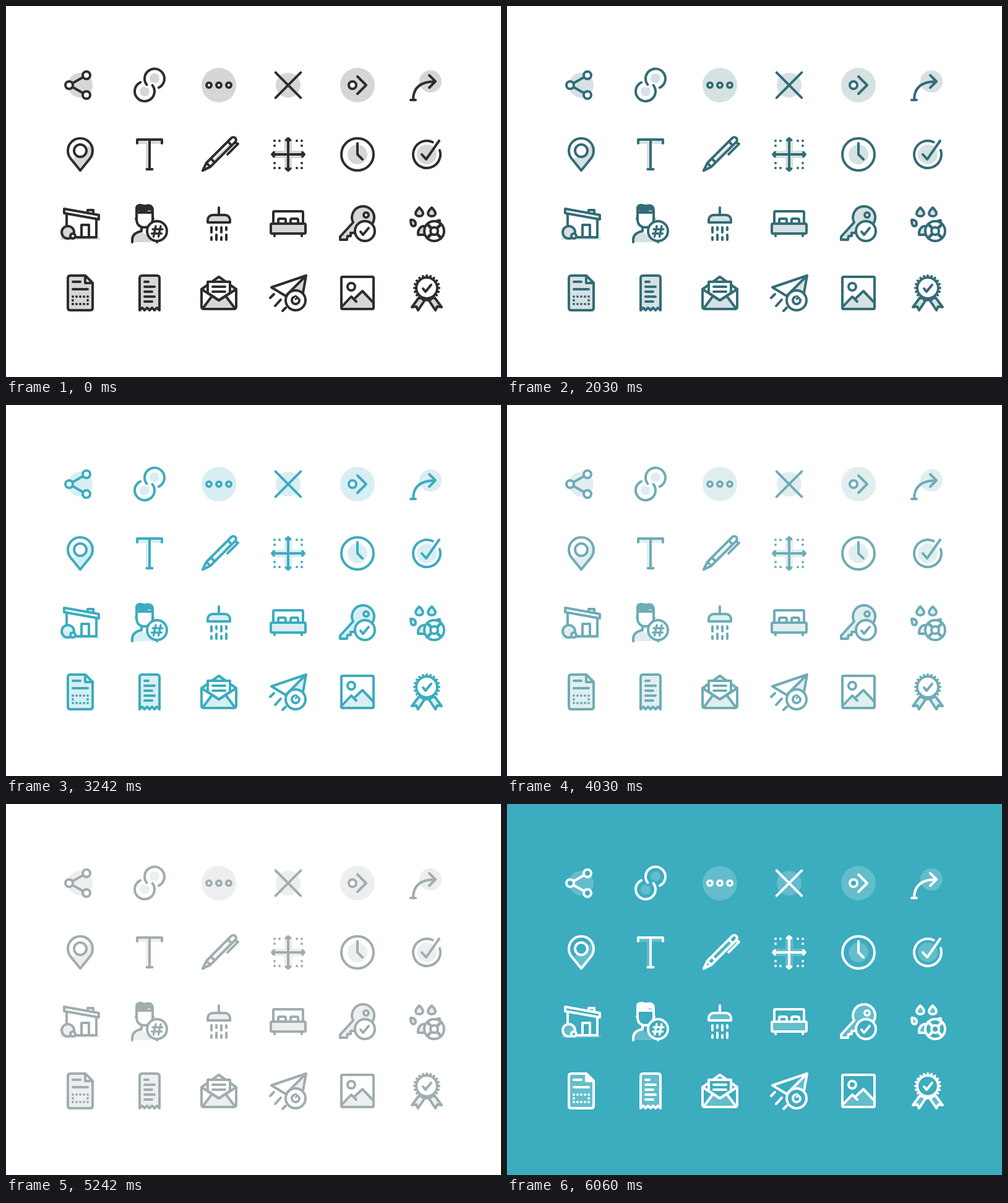
Animation of 800 by 600 pixels, one loop 7.99 s. Source, as an HTML page with a canvas:

```html
<!DOCTYPE html>
<html lang="en">
<head>
<meta charset="utf-8">
<title>Icon set themes</title>
<style>
html, body { margin: 0; width: 100%; height: 100%; overflow: hidden; background: #fff; }
canvas { display: block; }
</style>
</head>
<body>
<canvas id="stage" width="800" height="600"></canvas>
<script>
const ctx = document.getElementById('stage').getContext('2d');
const LOOP = 7990;
const themes = [
  { from: 0,    bg: '#ffffff', line: '#2b2e2e', tint: '#d5d7d6' },
  { from: 2030, bg: '#ffffff', line: '#336c77', tint: '#d6e1e3' },
  { from: 2060, bg: '#ffffff', line: '#3cacbf', tint: '#d8eef2' },
  { from: 4030, bg: '#ffffff', line: '#6eacb7', tint: '#e1eef0' },
  { from: 4060, bg: '#ffffff', line: '#a0adae', tint: '#eceeef' },
  { from: 6030, bg: '#9dd6df', line: '#d0d6d8', tint: '#a8d4db' },
  { from: 6060, bg: '#3cacbf', line: '#ffffff', tint: '#63bdcc' }
];
let theme;

// Every icon lives in a 64 x 64 box.
function fill(d, color = theme.tint) {
  ctx.fillStyle = color;
  ctx.fill(new Path2D(d));
}
function line(d, width = 4, color = theme.line) {
  ctx.lineWidth = width;
  ctx.strokeStyle = color;
  ctx.stroke(new Path2D(d));
}
function shape(d, color) {
  fill(d, color);
  line(d);
}
const circle = (x, y, r) => `M${x - r} ${y}a${r} ${r} 0 1 1 ${2 * r} 0a${r} ${r} 0 1 1 ${-2 * r} 0z`;
const box = (x, y, w, h) => `M${x} ${y}h${w}v${h}h${-w}z`;
const disc = (x, y, r) => fill(circle(x, y, r));
const ring = (x, y, r, color = theme.bg) => shape(circle(x, y, r), color);
const dot = (x, y) => fill(circle(x, y, 2), theme.line);

function arc(x, y, r, a, b, width, color = theme.line) {
  ctx.beginPath();
  ctx.arc(x, y, r, a * Math.PI / 180, b * Math.PI / 180);
  ctx.lineWidth = width;
  ctx.strokeStyle = color;
  ctx.stroke();
}

function share() {
  disc(32, 32, 20);
  line('M42 16L14 32L42 48');
  ring(14, 32, 6);
  ring(42, 16, 6);
  ring(42, 48, 6);
}

function link() {
  disc(40, 21, 8);
  disc(24, 42, 8);
  for (const [w, color] of [[10, theme.bg], [4, theme.line]]) {
    arc(40, 21.5, 16, 142, 425, w, color);
    arc(24, 42, 16, -38, 245, w, color);
  }
}

function more() {
  disc(32, 32, 28);
  for (const x of [16, 32, 48]) ring(x, 32, 4);
}

function cross() {
  disc(32, 32, 20);
  line('M11.7 11.7L52.3 52.3M52.3 11.7L11.7 52.3');
}

function next() {
  disc(32, 32, 28);
  ring(24, 32, 6);
  line('M32 18L46 32L32 46');
}

function forward() {
  disc(38, 26, 18);
  line('M6 56H14M10 56C10 38 20 26 46 26M36 16L46 26L36 36');
}

function pin() {
  const d = 'M32 58L17 39.5C14 36 12 31 12 26A20 20 0 0 1 52 26C52 31 50 36 47 39.5Z';
  ctx.save();
  ctx.clip(new Path2D(d));
  fill('M52 14L14 44L32 62H60V14Z');
  ctx.restore();
  line(d);
  ring(32, 26, 10);
}

function letter() {
  fill(box(12, 8, 40, 7) + box(26, 8, 6, 48));
  line('M12 14V8H52V14M32 8V56M27.500 56H36.500');
}

function pen() {
  ctx.translate(32, 32);
  ctx.rotate(-Math.PI / 4);
  fill(box(-14, 0, 39, 4.5));
  line('M-37 0L-24 -4.500H33A4.500 4.500 0 0 1 33 4.500H-24ZM-24 -4V4M-14 -4V4M25 -4V4M32 4.500L34 9.900H10');
}

function grid() {
  fill(box(10, 26, 44, 12) + box(26, 10, 12, 44));
  line('M6 32H58M32 6V58M9 28.500L6 32L9 35.500M55 28.500L58 32L55 35.500M28.500 9L32 6L35.500 9M28.500 55L32 58L35.500 55');
  for (const x of [10, 18, 46, 54])
    for (const y of [10, 18, 46, 54])
      if (x % 44 === 10 || y % 44 === 10) dot(x, y);
}

function clock() {
  line(circle(32, 32, 26));
  disc(32, 32, 16);
  line('M32 14V32L40 40');
}

function check() {
  disc(32, 32, 16);
  arc(32, 32, 22, -18, 296, 4);
  line('M24 32L31 40L52 10');
}

function house() {
  fill('M2 54H62A2 2 0 0 1 62 58H2A2 2 0 0 1 2 54Z');
  line('M10 16V36M58 24V54H18M34 54V34H46V54M44 13V10H53V15');
  shape('M6 8L62 18V25L6 15Z', theme.bg);
  ring(12, 46, 10, theme.tint);
  ring(20, 52, 4);
}

function user() {
  fill('M5 62V58C5 50 12 47 19 44C24 50 30 50 35 62Z');
  line('M4 62V58C4 50 10 46 19 44V38M44 60V62');
  dot(10, 24);
  dot(38, 24);
  shape('M11 14V25C11 33 16 38 23.500 38C31 38 37 33 37 25V14Z', theme.bg);
  fill('M9 16V7C9 1 15 -1 20 .5C24 2 26 1 29 .5C36 0 39 5 39 10V16H36C36 10 31 10 28 12C23 14 16 14 14 11L12 16Z', theme.line);
  ring(44, 44, 16);
  line('M42 36L38.500 53M50 36L46.500 53M37 41H53M35.500 48H51.500', 3.4);
}

function shower() {
  line('M32 6V18');
  shape('M14 30V26A8 8 0 0 1 22 18H42A8 8 0 0 1 50 26V30Z', theme.tint);
  line('M20 38V46M20 54V58M28 38V42M28 50V58M36 38V46M36 54V58M44 38V42M44 50V58');
}

function bed() {
  line('M8 32V14Q8 12 10 12H54Q56 12 56 14V32M10 50V52M54 50V52');
  for (const x of [16, 36]) line(`M${x} 31V26Q${x} 24 ${x + 2} 24H${x + 10}Q${x + 12} 24 ${x + 12} 26V31`);
  shape('M6 32H58Q60 32 60 34V46Q60 48 58 48H6Q4 48 4 46V34Q4 32 6 32Z', theme.tint);
}

function key() {
  shape('M25 30A18 18 0 1 1 34 38.500L26 47H21V52H16L15 58H4V53Z', theme.tint);
  ring(46, 18, 4);
  ring(44, 44, 16);
  line('M37 45L41 50L50 39');
}

function paw() {
  const toe = x => `M${x} 6C${x - 3} 9 ${x - 6} 12 ${x - 6} 15.500C${x - 6} 18.500 ${x - 3} 20 ${x} 20C${x + 3} 20 ${x + 6} 18.500 ${x + 6} 15.500C${x + 6} 12 ${x + 3} 9 ${x} 6Z`;
  shape(toe(20), theme.tint);
  shape(toe(40), theme.tint);
  shape('M6 26C10 25 14 28 14 32C14 35 12 36 10 36C7 36 6 32 6 26Z', theme.tint);
  shape('M53 27C50 26 46 28 46 32L52 34Z', theme.tint);
  shape('M18 50C17 43 21 36 28 36C34 36 38 50 38 50Z', theme.tint);
  ring(44, 44, 16);
  line('M33 33L55 55M55 33L33 55', 5);
  ring(44, 44, 6);
}

function sheet() {
  shape('M16 4H40L52 16V56Q52 60 48 60H16Q12 60 12 56V8Q12 4 16 4Z', theme.tint);
  shape('M40 4V16H52Z', '#fff');
  line('M20 14H32M20 26H44');
  for (let x = 20; x <= 44; x += 6)
    for (let y = 38; y <= 50; y += 6)
      if (y !== 44 || x % 24 === 20) dot(x, y);
}

function receipt() {
  shape('M16 60V8Q16 4 20 4H44Q48 4 48 8V60l-4 -4l-4 4l-4 -4l-4 4l-4 -4l-4 4l-4 -4Z', theme.tint);
  line('M24 14H30M24 22H40M24 30H36M24 38H40M24 46H36');
}

function mail() {
  fill('M8 57L22 38L32 44L42 38L56 57Z');
  line('M4 26L32 6L60 26');
  shape('M14 32V14H50V32L32 44Z', theme.bg);
  line('M22 22H42M22 30H42');
  line('M4 26V54Q4 58 8 58H56Q60 58 60 54V26L32 44ZM6 57L21 37M58 57L43 37');
}

function send() {
  fill('M61 4L27 37L56 34Z');
  line('M61 4L5 23L28 37ZM61 4L56 32M3 40L9 34M11 53L20 43M23 61L28 56');
  ring(44, 44, 16);
  arc(44, 44, 6, -15, 245, 4);
  line('M44 37L48 40L44 42', 3);
}

function picture() {
  fill('M6 56L22 38L29 44L40 29L58 48V58H6Z');
  line('M8 6H56Q58 6 58 8V56Q58 58 56 58H8Q6 58 6 56V8Q6 6 8 6Z');
  line('M6 55L22 38L30 46M26.500 42L40 29L58 48');
  line(circle(22, 22, 6));
}

function award() {
  shape('M19 40L8 55L15 54L18 60L30 42Z', theme.tint);
  shape('M45 40L56 55L49 54L46 60L34 42Z', theme.tint);
  for (let i = 0; i < 20; i++) {
    const a = i * Math.PI / 10;
    dot(32 + 20 * Math.cos(a), 24 + 20 * Math.sin(a));
  }
  ring(32, 24, 17);
  line('M26 25L30 30L39 19');
}

const icons = [
  share, link, more, cross, next, forward,
  pin, letter, pen, grid, clock, check,
  house, user, shower, bed, key, paw,
  sheet, receipt, mail, send, picture, award
];

function draw() {
  ctx.fillStyle = theme.bg;
  ctx.fillRect(0, 0, 800, 600);
  ctx.lineCap = ctx.lineJoin = 'round';
  icons.forEach((icon, i) => {
    ctx.save();
    ctx.translate(88 + 112 * (i % 6), 96 + 112 * Math.floor(i / 6));
    icon();
    ctx.restore();
  });
}

const start = performance.now();
function tick() {
  const t = (performance.now() - start) % LOOP;
  const current = themes.filter(p => p.from <= t).pop();
  if (current !== theme) {
    theme = current;
    draw();
  }
  requestAnimationFrame(tick);
}
tick();
</script>
</body>
</html>
```
